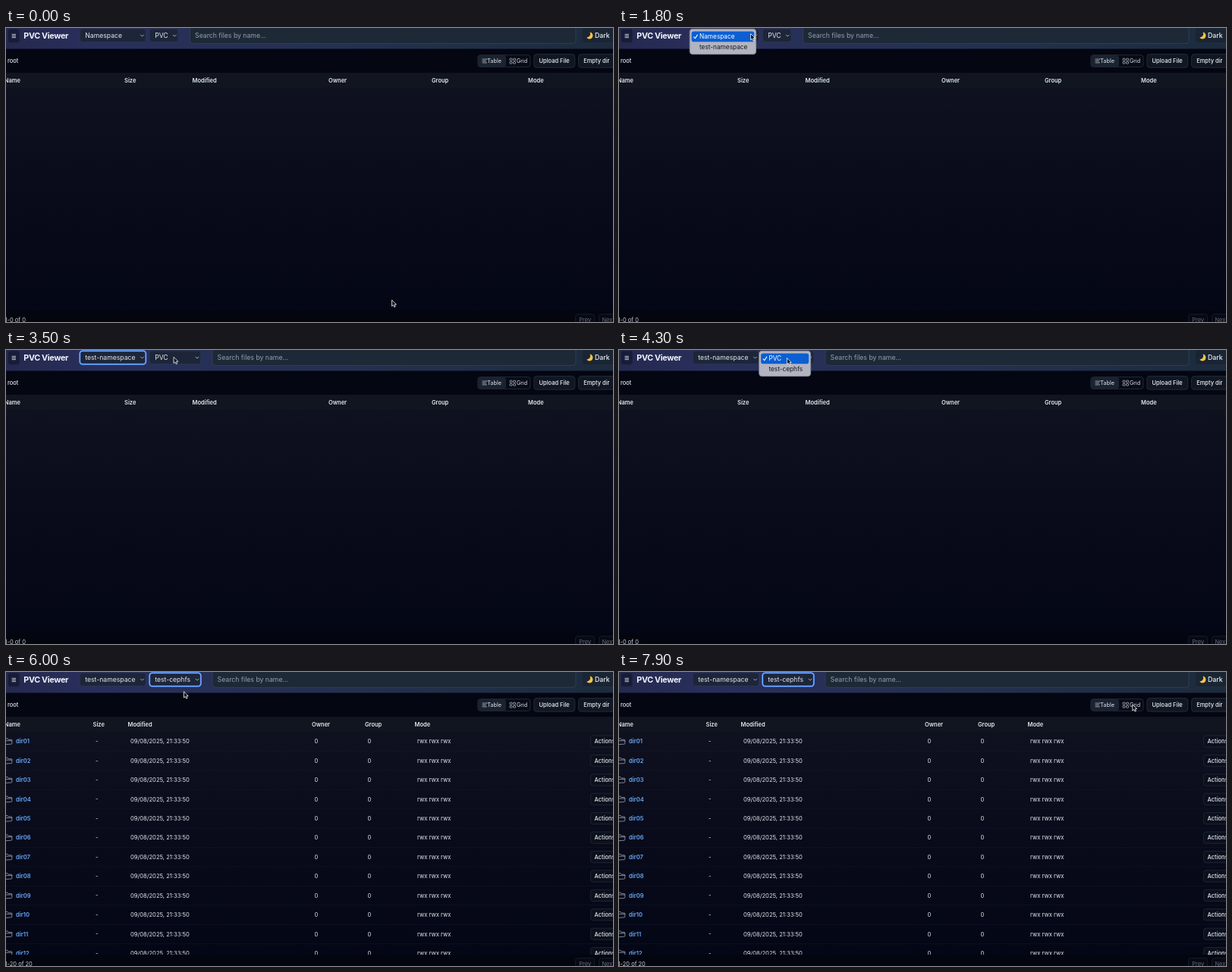
An HTML page for the animation above (8000 ms loop, 800 px wide and 388 px high).

```html
<!DOCTYPE html>
<html lang="en">
<head>
<meta charset="utf-8">
<title>PVC Viewer</title>
<style>
  html, body { margin: 0; width: 100%; height: 100%; overflow: hidden; background: #040714; }
  svg { display: block; width: 100vw; height: 100vh; font-family: Inter, "Liberation Sans", sans-serif; }
  text { white-space: pre; }
</style>
</head>
<body>
<svg id="stage" viewBox="0 0 800 388">
  <defs>
    <linearGradient id="bar">
      <stop offset="0" stop-color="#25294f"/>
      <stop offset=".15" stop-color="#292f5c"/>
      <stop offset=".55" stop-color="#243150"/>
      <stop offset="1" stop-color="#1c2b3d"/>
    </linearGradient>
    <linearGradient id="page" x2="0" y2="1">
      <stop offset="0" stop-color="#0f1120"/>
      <stop offset=".45" stop-color="#090b1b"/>
      <stop offset="1" stop-color="#030615"/>
    </linearGradient>
    <clipPath id="list"><path d="M0 80H800V373H0Z"/></clipPath>
  </defs>
</svg>
<script>
const stage = document.getElementById('stage');
const LOOP = 8000, STEP = 100;

const text = (x, y, s, size = 7.5, fill = '#e2e6ee', weight = 400, extra = '') =>
  `<text x="${x}" y="${y}" font-size="${size}" fill="${fill}" font-weight="${weight}" ${extra}>${s}</text>`;
const box = (x, y, w, h, fill, stroke = 'none', r = 3, sw = .8) =>
  `<rect x="${x}" y="${y}" width="${w}" height="${h}" rx="${r}" fill="${fill}" stroke="${stroke}" stroke-width="${sw}"/>`;
const line = (d, stroke, w = .8) =>
  `<path d="${d}" fill="none" stroke="${stroke}" stroke-width="${w}" stroke-linecap="round" stroke-linejoin="round"/>`;

function select(x, w, label, focus) {
  const edge = focus
    ? box(x, 1.2, w, 17.6, '#1d2639', '#3b82f6', 3.5, 2) + box(x, 1.2, w, 17.6, 'none', '#a9c8fa', 3.5, .7)
    : box(x, 1, w, 17.5, '#1d2639', '#2c3852', 3.5);
  return edge + text(x + 7, 13.2, label, 8.65) +
    line(`M${x + w - 6.8} 9.1l2 2l2-2`, '#aeb6c6', .9);
}

function popup(x, w, items, active) {
  return box(x, 1.3, w, 33.4, '#b2b4c0', '#85899b', 4) +
    box(x + 2.5, active ? 18.6 : 4.6, w - 5, 13.6, '#0b5fd3', 'none', 2.8) +
    items.map((s, i) => text(x + 12.8, 14.4 + 14 * i, s, 8.25, i === active ? '#fff' : '#15171f')).join('') +
    line(`M${x + 5.5} 11.8l1.6 1.9l3-4.6`, active ? '#15171f' : '#fff', 1.1);
}

function header(ns, pvc, focus) {
  const wide = ns !== 'Namespace';
  const searchX = wide ? 272 : 242.5;
  return box(0, 0, 800, 27.5, 'url(#bar)', 'none', 0) +
    box(2.5, 1, 15.5, 18.5, '#171c38', '#242b4a', 3.5) +
    line('M8 8.4h4.6M8 10.5h4.6M8 12.6h4.6', '#e2e6ee', .9) +
    text(23.3, 14, 'PVC Viewer', 10.8, '#f1f4fa', 700, 'letter-spacing="-.35"') +
    select(97.3, 87, ns, focus === 'ns') +
    select(189.2, wide ? 67.6 : 37.8, pvc, focus === 'pvc') +
    box(searchX, -3, 751 - searchX, 23.4, '#1e2938', '#35435a', 4) +
    text(searchX + 6.6, 13.2, 'Search files by name...', 8.7, '#969eac') +
    box(759, -3, 50, 22.7, '#1a2534', '#253245', 4) +
    '<path d="M769.6 5.6a4.5 4.5 0 1 1-4.4 6.8a4.6 4.6 0 0 0 4.4-6.8z" fill="#f6c544"/>' +
    text(776, 13.2, 'Dark', 8.75, '#eceff5', 500);
}

function toolbar() {
  return box(0, 27.5, 800, 31.5, '#040612', 'none', 0) +
    text(2, 46.3, 'root', 7.5, '#e2e6ee', 500) +
    box(621.8, 35.6, 69.2, 15.8, '#070b16', '#2a3141', 3.5) +
    box(622.2, 36, 36.8, 15, '#1b2331', 'none', 3) +
    line('M628 41.2h6M628 43.5h4.4M628 45.8h5.4', '#c4cad6') +
    text(634.2, 46.2, 'Table', 7.3) +
    [[664, 40.2], [668.6, 40.2], [664, 44.4], [668.6, 44.4]]
      .map(([x, y]) => box(x, y, 3, 2.7, 'none', '#c4cad6', .6, .7)).join('') +
    text(673, 46.2, 'Grid', 7.1) +
    box(695.8, 34.6, 54, 17.6, '#111722', '#2a3141', 3.5) +
    text(702.5, 46.3, 'Upload File', 7.5, '#eceff5', 500) +
    box(754.6, 34.6, 60, 17.6, '#111722', '#2a3141', 3.5) +
    text(761.2, 46.3, 'Empty dir', 7.5, '#eceff5', 500);
}

function table(loaded) {
  const cols = loaded ? [-2.2, 114.5, 160.5, 403, 473, 538.5] : [-2.2, 156, 245.5, 425, 561, 688];
  const head = box(0, 59, 800, 20.8, '#10151f', 'none', 0) +
    ['Name', 'Size', 'Modified', 'Owner', 'Group', 'Mode']
      .map((s, i) => text(cols[i], 72.4, s, 7.5, '#e2e6ee', 600)).join('');
  let rows = '';
  for (let i = 0; loaded && i < 12; i++) {
    const y = 91.6 + 25.41 * i;
    rows += line(`M0 ${y + 12.9}H800`, '#12172a', .6) +
      line(`M-1 ${y + 3.6}V${y - 3.8}h3l1.2 1.5h3.8q.8 0 .8.8v4.3q0 .8-.8.8zM-1 ${y - .9}h8.8`, '#9aa2b1', .8) +
      text(13, y + 2.8, 'dir' + String(i + 1).padStart(2, '0'), 7.6, '#68a8f8', 600) +
      text(118, y + 2.6, '-', 7.6) +
      text(164, y + 2.8, '09/08/2025, 21:33:50', 7.6) +
      text(406.5, y + 2.8, '0', 7.6) + text(476.5, y + 2.8, '0', 7.6) +
      text(542, y + 2.8, 'rwx rwx rwx', 7.65) +
      box(770.6, y - 7.6, 50, 15.2, '#0b101c', '#232a3a', 3) +
      text(775.5, y + 2.8, 'Actions', 7.5, '#e2e6ee', 500);
  }
  return box(0, 79.8, 800, 308.2, 'url(#page)', 'none', 0) + head +
    `<g clip-path="url(#list)">${rows}</g>` +
    box(0, 373.4, 800, 15, '#03050f', 'none', 0) +
    text(-1.5, 387.8, loaded ? '1-20 of 20' : '1-0 of 0', 7.5, '#c9cfda') +
    box(750.5, 377.6, 25.2, 16, '#070a15', '#1b2130') + text(755.2, 387.8, 'Prev', 7.5, '#646a78') +
    box(781.5, 377.6, 30, 16, '#070a15', '#1b2130') + text(785.4, 387.8, 'Next', 7.5, '#646a78');
}

// Pointer waypoints: time, x, y
const path = [
  [0, 508.6, 359], [100, 508.6, 359], [1000, 174.3, 5.8], [1700, 174.3, 5.8], [2200, 167.3, 22.6],
  [2700, 167.3, 22.6], [3000, 190, 34], [3450, 221, 9.3], [4200, 221, 9.3], [4700, 225, 22.8],
  [5500, 225, 22.8], [5900, 234.4, 25.8], [6400, 234.4, 25.8], [7600, 676.8, 42.8], [LOOP, 676.8, 42.8]
];

function pointer(t) {
  const i = path.findIndex(p => p[0] > t);
  const [t0, x0, y0] = path[i - 1], [t1, x1, y1] = path[i];
  const u = (t - t0) / (t1 - t0), e = u * u * (3 - 2 * u);
  return [x0 + (x1 - x0) * e, y0 + (y1 - y0) * e];
}

function scene(t) {
  const [x, y] = pointer(t);
  const ns = t < 2700 ? 'Namespace' : 'test-namespace';
  const pvc = t < 5500 ? 'PVC' : 'test-cephfs';
  const focus = t >= 5500 ? 'pvc' : t >= 2700 && t < 3900 ? 'ns' : '';
  const active = y > 17.5 ? 1 : 0;
  let menu = '';
  if (t >= 1500 && t < 2700) menu = popup(93.2, 87.4, ['Namespace', 'test-namespace'], active);
  if (t >= 3900 && t < 5500) menu = popup(184.6, 68, ['PVC', 'test-cephfs'], active);
  return table(t >= 5700) + toolbar() + header(ns, pvc, focus) + menu +
    `<path transform="translate(${x} ${y})" d="M0 0V8.2L1.9 6.5L3.2 9.3L4.6 8.7L3.4 5.9H5.9Z"
      fill="#0a0a0e" stroke="#fff" stroke-width=".8" stroke-linejoin="round"/>`;
}

const layer = document.createElementNS('http://www.w3.org/2000/svg', 'g');
stage.append(layer);
let shown = -1;
function tick(now) {
  const t = Math.floor(now % LOOP / STEP) * STEP;
  if (t !== shown) layer.innerHTML = scene(shown = t);
  requestAnimationFrame(tick);
}
tick(performance.now());
</script>
</body>
</html>
```
